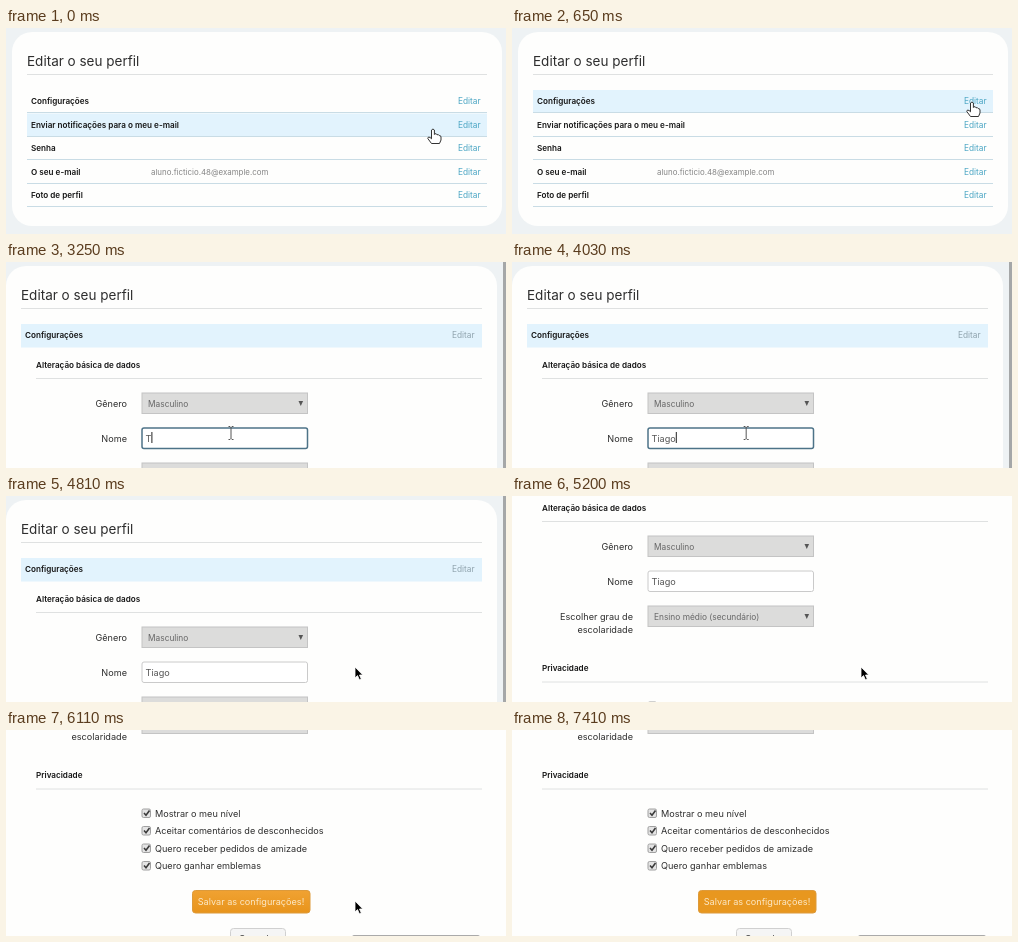
Animation, 500 px wide and 206 px high, one loop 7.67 s. Source, as an HTML page:

```html
<!DOCTYPE html>
<html lang="pt">
<head>
<meta charset="utf-8">
<title>Editar perfil</title>
<style>
  html, body { margin: 0; width: 100%; height: 100%; overflow: hidden; background: #eef2f4; }
  svg { display: block; width: 500px; height: 206px; font: 9.15px Inter, sans-serif; fill: #2e2e2e; }
  .title { font-size: 13.5px; }
  .bold { font-size: 8.15px; font-weight: 600; fill: #161616; }
  .edit { font-size: 8.3px; fill: #4aa5c3; }
  .mail { font-size: 7.9px; fill: #858585; }
  .value { font-size: 8.35px; fill: #666; }
  .label { text-anchor: end; }
  .card { fill: #fefefd; }
  .hover { fill: #e2f3fd; }
  .rule { fill: none; stroke: #dfe1e1; }
  .select { fill: #dcdcdb; stroke: #c4c4c4; }
  .box { fill: #e4e4e4; stroke: #a0a0a0; }
  .tick { fill: none; stroke: #3a3a3a; stroke-width: 1.6; }
</style>
</head>
<body>
<svg viewBox="0 0 500 206">
  <defs>
    <linearGradient id="orange" x2="0" y2="1">
      <stop stop-color="#f0a232"/><stop offset="1" stop-color="#e8941c"/>
    </linearGradient>
  </defs>

  <g id="list">
    <rect class="card" x="6" y="4" width="490" height="194" rx="20"/>
    <text class="title" x="21" y="38">Editar o seu perfil</text>
    <path class="rule" d="M21 46.5H481"/>
    <rect id="hover" class="hover" x="21" width="460" height="23"/>
    <g id="rows"></g>
    <text class="mail" x="145" y="147">aluno.ficticio.48@example.com</text>
  </g>

  <g id="form">
    <g id="page">
      <rect id="sheet" class="card" y="4" height="600" rx="20"/>
      <text class="title" x="15" y="38">Editar o seu perfil</text>
      <path class="rule" d="M15 46.5H476M30 116.5H476M30 277H476"/>
      <rect class="hover" x="15" y="62" width="461" height="23.5"/>
      <text class="bold" x="19" y="76">Configurações</text>
      <text class="edit" x="446" y="76" style="fill:#8fa3ad">Editar</text>
      <text class="bold" x="30" y="105.5">Alteração básica de dados</text>

      <text class="label" x="121" y="144.5">Gênero</text>
      <text class="label" x="121" y="179.5">Nome</text>
      <text class="label" x="121" y="214.5">Escolher grau de</text>
      <text class="label" x="121" y="228">escolaridade</text>
      <g id="selects"></g>
      <rect id="input" x="136" y="166" width="165.5" height="20.5" rx="2" fill="#fff"/>
      <text id="name" x="139.5" y="179.5" fill="#555"></text>
      <path id="caret" stroke="#222" d="M0 170V181"/>

      <text class="bold" x="30" y="266">Privacidade</text>
      <g id="checks"></g>
      <rect id="save" x="186.5" y="378.5" width="117.5" height="22.5" rx="3" fill="url(#orange)" stroke="#dd9a3a"/>
      <text x="245" y="393" text-anchor="middle" fill="#fbe8c6">Salvar as configurações!</text>
      <rect x="224.5" y="416.5" width="55" height="21" rx="3" fill="#f5f5f5" stroke="#d0d0d0"/>
      <text x="252" y="430" text-anchor="middle" fill="#444">Cancelar</text>
      <rect x="346" y="423.5" width="128" height="30" rx="2" fill="#eee" stroke="#aaa"/>
    </g>
    <rect id="scrollbar" x="497" width="3" height="206" fill="#a5a7a8"/>
  </g>

  <g id="cursor">
    <path id="arrow" fill="#000" stroke="#fff" stroke-width=".8" d="M0 0V11L2.5 8.6L4.4 12.8L6.3 12L4.5 8H7.8Z"/>
    <path id="beam" fill="none" stroke="#555" d="M-2.5 -6.5H-1L0 -5.5L1 -6.5H2.5M0 -5.5V5.5M-2.5 6.5H-1L0 5.5L1 6.5H2.5"/>
    <path id="hand" fill="#fff" stroke="#333" stroke-linejoin="round"
      d="M-1.5 1Q0 -1 1.4 1V5.5L2 4.8Q3.5 4.3 4 5.8Q5.6 5 6.2 6.6Q7.8 6.2 8 8V11L6.5 14.5H-1.5L-5.2 9.5Q-5.2 7.3 -3 8.4L-1.5 9.8Z"/>
  </g>
</svg>

<script>
const $ = id => document.getElementById(id);
const LOOP = 7670, STEP = 130, OPEN = 1170;
const FOCUS = 2730, TYPE = 3250, BLUR = 4810;
const NAME = 'Tiago';

const cursorPath = [[0, 427, 101], [650, 460, 74], [1430, 460, 74], [2080, 195, 183],
  [2860, 225, 171], [3900, 225, 171], [4680, 349, 171], [6500, 349, 171], [6890, 288, 170]];
const scrollPath = [[4940, 0], [5200, 91], [5720, 197], [6110, 218]];
const linear = p => p;
const smooth = p => p * p * (3 - 2 * p);

// Value of one column of a keyframe path at time t.
function at(path, t, column, ease) {
  const next = path.findIndex(key => key[0] > t);
  if (next === 0) return path[0][column];
  if (next < 0) return path[path.length - 1][column];
  const a = path[next - 1], b = path[next];
  return a[column] + (b[column] - a[column]) * ease((t - a[0]) / (b[0] - a[0]));
}

const show = (id, visible) => $(id).style.display = visible ? '' : 'none';

$('rows').innerHTML = ['Configurações', 'Enviar notificações para o meu e-mail', 'Senha', 'O seu e-mail', 'Foto de perfil']
  .map((text, i) => {
    const y = 76 + i * 23.6;
    return `<text class="bold" x="25" y="${y}">${text}</text>
      <text class="edit" x="452" y="${y}">Editar</text>
      <path class="rule" style="stroke:#c9dce5" d="M21 ${Math.round(y + 9) - .5}H481"/>`;
  }).join('');

$('selects').innerHTML = [['Masculino', 131], ['Ensino médio (secundário)', 201]]
  .map(([text, y]) => `<rect class="select" x="136" y="${y}" width="165.5" height="20.5"/>
    <text class="value" x="142" y="${y + 13.5}">${text}</text>
    <path fill="#555" d="M292.5 ${y + 8}h4.6l-2.3 5z"/>`).join('');

$('checks').innerHTML = ['Mostrar o meu nível', 'Aceitar comentários de desconhecidos',
  'Quero receber pedidos de amizade', 'Quero ganhar emblemas']
  .map((text, i) => {
    const y = 301 + i * 17.5;
    return `<rect class="box" x="136" y="${y - 4}" width="8.5" height="8.5" rx="1.5"/>
      <path class="tick" d="M138 ${y}l2 2.2l3.5 -4.6"/>
      <text x="149" y="${y + 3.5}">${text}</text>`;
  }).join('');

function draw() {
  const t = Math.floor(performance.now() % LOOP / STEP) * STEP;
  const x = at(cursorPath, t, 1, smooth), y = at(cursorPath, t, 2, smooth);
  const scroll = at(scrollPath, t, 1, linear);

  show('list', t < OPEN);
  show('form', t >= OPEN);
  $('hover').setAttribute('y', y > 85 ? 85.5 : 62);
  $('page').setAttribute('transform', `translate(0 ${-scroll})`);
  $('sheet').setAttribute('width', scroll ? 500 : 491);
  show('scrollbar', !scroll);

  const focused = t >= FOCUS && t < BLUR;
  $('input').setAttribute('stroke', focused ? '#4d7388' : '#cacaca');
  $('input').setAttribute('stroke-width', focused ? 1.5 : 1);
  $('name').textContent = NAME.slice(0, Math.max(0, (t - TYPE) / STEP + 1));
  show('caret', focused);
  if (focused) $('caret').setAttribute('transform', `translate(${140 + $('name').getComputedTextLength()} 0)`);

  const onSave = t >= 6760;
  const kind = t < 1560 || onSave ? 'hand' : t < BLUR && x < 302 && y > 165 ? 'beam' : 'arrow';
  for (const id of ['arrow', 'beam', 'hand']) show(id, id === kind);
  show('cursor', t < 7410);
  $('cursor').setAttribute('transform', `translate(${x} ${y})`);
  $('save').setAttribute('fill', onSave ? '#e8971f' : 'url(#orange)');

  requestAnimationFrame(draw);
}
draw();
</script>
</body>
</html>
```
